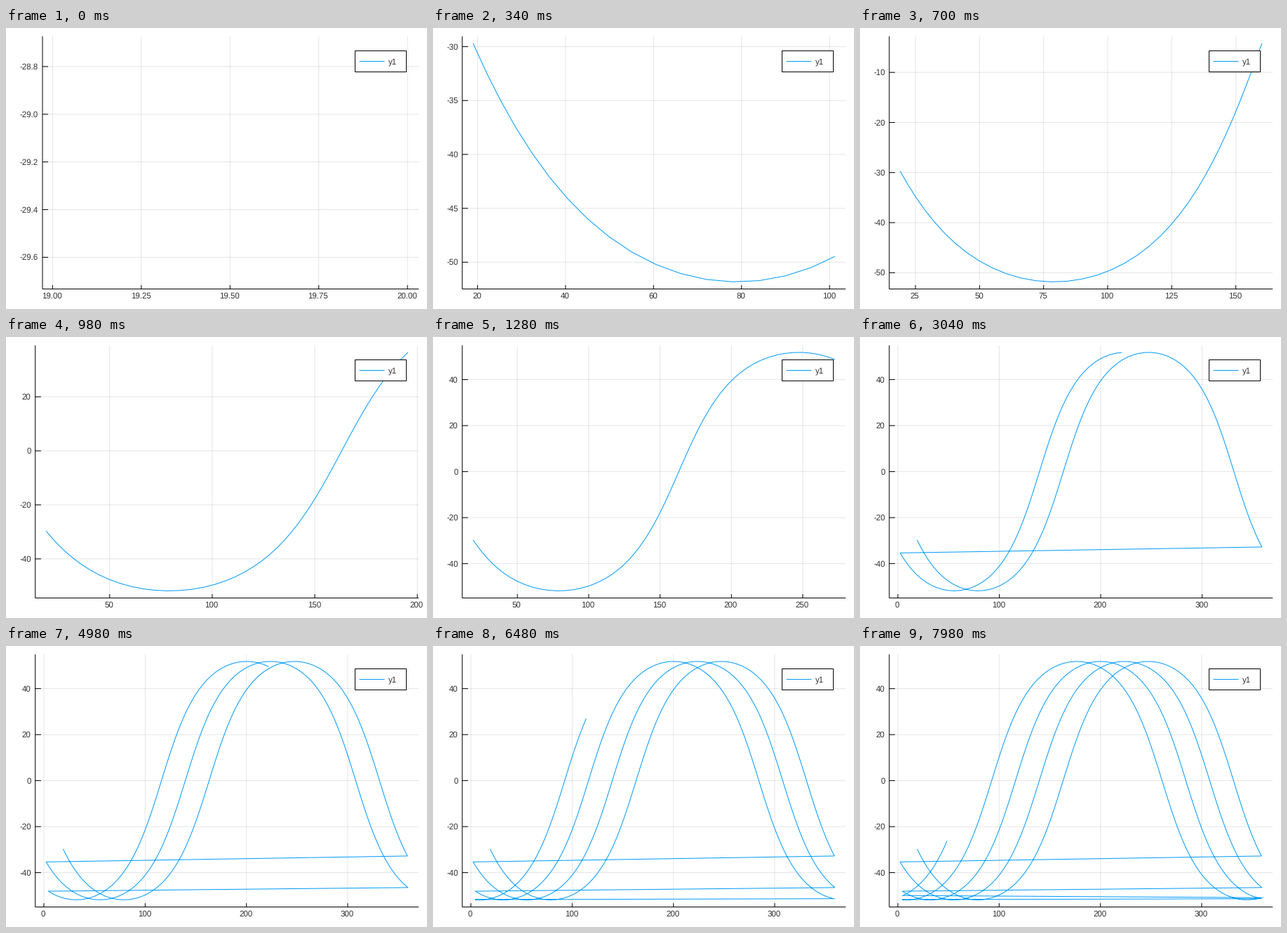
Animation, 600 px wide and 400 px high, one loop 8 s. Source, as a matplotlib script:

```python
import math

import numpy as np
import matplotlib.pyplot as plt
from matplotlib.animation import FuncAnimation
from matplotlib.collections import LineCollection, PolyCollection
from matplotlib.patches import Rectangle

plt.rcParams["font.family"] = "Liberation Sans"
plt.rcParams["text.hinting"] = "none"
plt.rcParams["path.simplify"] = False
plt.rcParams["path.snap"] = False

W, H, DPI = 600, 400, 100
FRAMES, INTERVAL = 400, 20
TOP, BOTTOM, RIGHT = 11.8, 371.5, 588.2
PX = 72 / DPI                       # one pixel in points
BLUE, INK = "#009afa", "#333333"
MAX_TICKS = 8

# Ground track of a circular orbit, one sample per minute
INCL = math.radians(51.64)
LON0, LAT0 = 19.0016, -29.703
STEP, SPIN = 3.877, 0.2532          # degrees per sample: orbit, ground
FLAT = 0.99330562                   # geocentric / geodetic tangent ratio


def ground_track(n):
    k = np.arange(n)
    start = math.atan(FLAT * math.tan(math.radians(-LAT0)))
    u0 = math.pi + math.asin(math.sin(start) / math.sin(INCL))
    u = u0 + np.radians(STEP) * k
    swept = np.unwrap(np.arctan2(math.cos(INCL) * np.sin(u), np.cos(u)))
    lon = (LON0 + np.degrees(swept - swept[0]) - SPIN * k) % 360
    lat = np.arcsin(math.sin(INCL) * np.sin(u))
    return lon, np.degrees(np.arctan(np.tan(lat) / FLAT))


LON, LAT = ground_track(FRAMES)


def limits(values):
    lo, hi = values.min(), values.max()
    if hi == lo:
        hi = lo + 1
    pad = 0.03 * (hi - lo)
    return lo - pad, hi + pad


def nice_ticks(lo, hi):
    """Score candidate steps; return tick values and their decimals."""
    span = hi - lo
    z = math.ceil(math.log10(span))
    steps = [(q * 10.0 ** e, w) for e in range(z - 3, z + 1)
             for q, w in ((1, 1), (5, .9), (2, .7), (2.5, .5), (3, .2))]
    zero = max(hi, 0) - min(lo, 0) < 2 * span
    best, found = -1, None
    for step, weight in sorted(steps, reverse=True):
        first, last = math.ceil(lo / step), math.floor(hi / step)
        n = last - first + 1
        if not 4 <= n <= MAX_TICKS:
            continue
        score = ((1 - abs(n - 5) / 5) / 4 + zero / 6
                 + 0.5 * span / ((n - 1) * step) + weight / 4)
        if score > best + 1e-9:
            best, found = score, (step, first, n)
    step, first, n = found
    digits = 0
    while abs(step * 10 ** digits - round(step * 10 ** digits)) > 1e-6:
        digits += 1
    return step * (first + np.arange(n)), digits


def spikes(pts):
    """Miter tips of the very sharp corners."""
    out = []
    jumps = np.nonzero(np.abs(np.diff(pts[:, 0])) > 250)[0]
    for j in jumps:
        for i in (j, j + 1):
            if not 0 < i < len(pts) - 1:
                continue
            a = pts[i] - pts[i - 1]
            b = pts[i] - pts[i + 1]
            a, b = a / np.hypot(*a), b / np.hypot(*b)
            s = math.sqrt(max(0.0, (1 - a @ b) / 2))
            if 0.1 <= s < 0.25:
                d = (a + b) / np.hypot(*(a + b))
                side = 0.5 * np.array([-d[1], d[0]])
                out.append([pts[i] - side, pts[i] + d * 0.5 / s, pts[i] + side])
    return out


fig = plt.figure(figsize=(W / DPI, H / DPI), dpi=DPI, facecolor="white")
ax = fig.add_axes([0, 0, 1, 1])
ax.set_xlim(0, W)
ax.set_ylim(H, 0)
ax.axis("off")


def segments(color, z):
    lines = LineCollection([], colors=[color], linewidths=PX, zorder=z)
    lines.set_snap(False)
    return ax.add_collection(lines, autolim=False)


def label(ha, x=0, y=0, text="", z=4):
    return ax.text(x, y, text, ha=ha, va="baseline", fontsize=8.3,
                   color=INK, zorder=z)


grid = segments((0, 0, 0, 0.1), 1)
marks = segments("black", 3)
tips = ax.add_collection(PolyCollection([], facecolors=BLUE, linewidths=0,
                                        zorder=2), autolim=False)
curve, = ax.plot([], [], color=BLUE, lw=PX, zorder=2, solid_joinstyle="miter",
                 solid_capstyle="butt")
frame_line, = ax.plot([], [], color="black", lw=PX, zorder=3, snap=False,
                      solid_joinstyle="miter", solid_capstyle="butt")
x_labels = [label("center") for _ in range(MAX_TICKS)]
y_labels = [label("right") for _ in range(MAX_TICKS)]

# Legend
ax.add_patch(Rectangle((497.5, 32.5), 73, 30, facecolor="white",
                       edgecolor="black", lw=PX, zorder=5, snap=False))
ax.plot([503.5, 539.5], [47.5, 47.5], color=BLUE, lw=PX, zorder=6,
        solid_capstyle="butt", snap=False)
label("left", 545.4, 52, "y1", 6)


def put_labels(pool, places, values, digits):
    for i, text in enumerate(pool):
        shown = i < len(values)
        text.set_visible(shown)
        if shown:
            text.set_position(places[i])
            text.set_text(f"{values[i] + 0.0:.{digits}f}")


def draw(k):
    lon, lat = LON[:k + 1], LAT[:k + 1]
    x_lo, x_hi = limits(lon)
    y_lo, y_hi = limits(lat)
    xt, x_digits = nice_ticks(x_lo, x_hi)
    yt, y_digits = nice_ticks(y_lo, y_hi)
    left = (41.7, 52, 58)[min(y_digits, 2)]

    def to_x(v):
        return left + (v - x_lo) / (x_hi - x_lo) * (RIGHT - left)

    def to_y(v):
        return BOTTOM - (v - y_lo) / (y_hi - y_lo) * (BOTTOM - TOP)

    pts = np.column_stack([to_x(lon), to_y(lat)])
    curve.set_data(pts[:, 0], pts[:, 1])
    tips.set_verts(spikes(pts))

    gx, gy = to_x(xt), to_y(yt)
    x_len, y_len = 0.015 * (BOTTOM - TOP), 0.015 * (RIGHT - left)
    grid.set_segments([[(x, TOP), (x, BOTTOM)] for x in gx]
                      + [[(left, y), (RIGHT, y)] for y in gy])
    marks.set_segments([[(x, BOTTOM), (x, BOTTOM - x_len)] for x in gx]
                       + [[(left, y), (left + y_len, y)] for y in gy])
    frame_line.set_data([left, left, RIGHT], [TOP, BOTTOM, BOTTOM])
    put_labels(x_labels, [(x - 0.8, 385) for x in gx], xt, x_digits)
    put_labels(y_labels, [(left - 6, y + 4) for y in gy], yt, y_digits)
    return []


anim = FuncAnimation(fig, draw, frames=FRAMES, interval=INTERVAL,
                     init_func=lambda: draw(0), repeat=True, repeat_delay=0)
plt.show()
```
